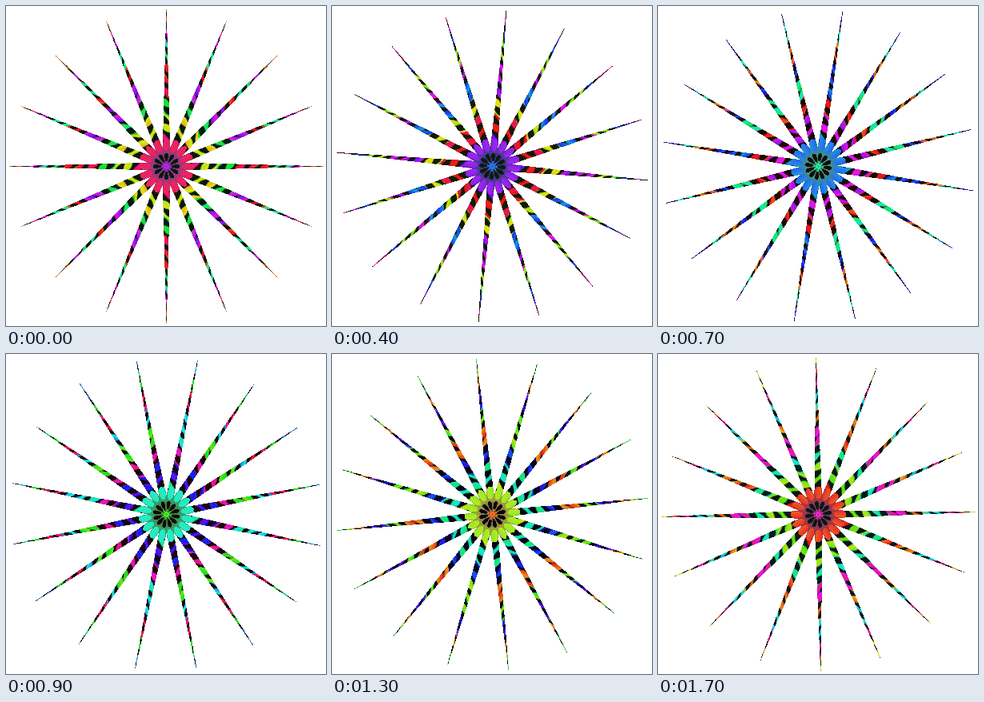
An HTML page with a canvas that plays this animation: 400 by 400 pixels, repeating every 1800 ms.

```html
<!DOCTYPE html>
<html lang="en">
<head>
<meta charset="utf-8">
<title>Turning star</title>
<style>
html, body { margin: 0; width: 100%; height: 100%; overflow: hidden; background: #fff; }
canvas { display: block; width: 400px; height: 400px; image-rendering: pixelated; }
</style>
</head>
<body>
<canvas id="stage" width="400" height="400"></canvas>
<script>
const SIZE = 400, MID = 200.5, STEPS = 18, STEP_MS = 100;
const TURN = 1.275 * Math.PI / 180;
const GAP = Math.PI / 8, WEDGE = Math.PI / 6, REACH = 196;
const RED = 342, PURPLE = 283;
const HUES = [RED, 60, 135, PURPLE, 5, 150, 300, 20];

const { sin, cos, abs, min, max, round, floor, hypot } = Math;
const ctx = document.getElementById("stage").getContext("2d");
const image = ctx.createImageData(SIZE, SIZE);
const pixels = new Uint32Array(image.data.buffer);

const clamp = v => min(1, max(0, v));
const fold = (a, size) => a - round(a / size) * size;

// Hue drifts round the wheel, a little slower at first
const drift = step => 19.3 * step - 10 * sin(2 * Math.PI * step / STEPS);

function hsv(hue, sat, val, shift) {
  const part = n => {
    const k = (n + (hue - shift) / 60 + 720) % 6;
    return round(255 * val * (1 - sat * clamp(min(k, 4 - k))));
  };
  return (255 << 24 | part(1) << 16 | part(3) << 8 | part(5)) >>> 0;
}

// Light 0 is the near-black ground, light 1 the full colour
function glow(hue, light, shift) {
  return light < 0.2 ? hsv(150, 0.9, 0.1 + light / 3, shift)
    : hsv(hue, 0.9, 0.2 + 0.7 * light, shift);
}

function core(r, a, shift) {
  if (r < 5 + 1.5 * cos(a * 8)) return hsv(PURPLE, 0.82, 0.85 - 0.15 * sin(r * 2), shift);
  const petal = hypot((r - 11) / 6, fold(a, WEDGE) / 0.19);
  if (petal < 1) return glow(0, 0, shift);
  return hsv(295 + r, 0.65, 0.42 + 0.011 * r, shift);
}

function arm(r, u, kind, shift) {
  const seed = min(kind, 4 - kind) * 1.7;
  const side = kind === 3 ? -u : u;
  const tip = hypot((r - 27) / 8, u / 0.85);
  if (tip < 1) return hsv(RED + 8 * u, 0.85, 0.92, shift);
  if (r < 30) return hsv(322, 0.65, 0.62, shift);

  const wavy = r + 3 * side + (kind === 2 ? 8 : 0);
  const band = min(7, max(0, floor((wavy - 18) / 23)));
  const hue = kind === 0 && band === 3 ? RED : HUES[band];
  const rich = band === 3 ? 0.55 : 0;
  const wave = sin(r * 0.42 + side * 1.1 + seed) + 0.55 * sin(r * 0.17 - side + seed * 2);
  return glow(hue + 12 * sin(r * 0.3 + side), clamp(0.5 + 1.3 * (wave + rich)), shift);
}

function colour(x, y, step, shift) {
  const r = hypot(x, y);
  if (r > REACH) return 0xffffffff;
  const a = Math.atan2(x, -y) - step * TURN;
  if (r < 17) return core(r, a, shift);
  const off = fold(a, GAP);
  const along = r * cos(off);
  const half = 0.34 + 4.45 * max(0, 1 - (along - 22) / 174) ** 1.08;
  const u = r * sin(off) / half;
  const kind = (round(a / GAP) + 16) % 4;
  if (abs(u) < 1) return arm(along, u, kind, shift);
  return r < 22 ? core(r, a, shift) : 0xffffffff;
}

function draw(step) {
  const shift = drift(step);
  for (let i = 0; i < pixels.length; i++) {
    const x = i % SIZE + 0.5 - MID, y = floor(i / SIZE) + 0.5 - MID;
    pixels[i] = colour(x, y, step, shift);
  }
  ctx.putImageData(image, 0, 0);
}

let shown = -1;
function tick() {
  const step = floor(performance.now() / STEP_MS) % STEPS;
  if (step !== shown) draw(shown = step);
  requestAnimationFrame(tick);
}
tick();
</script>
</body>
</html>
```
